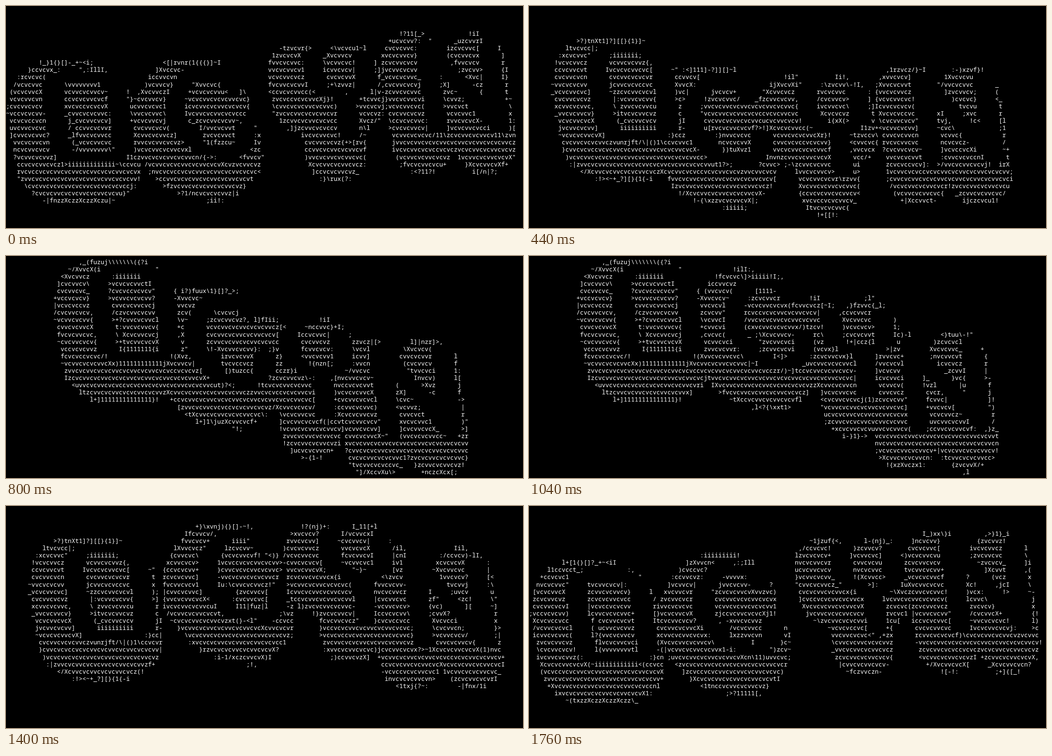
Animation, 1072 px wide and 462 px high, one loop 1.8 s. Source, as an HTML page with a canvas:

```html
<!DOCTYPE html>
<html>
<head>
<meta charset="utf-8">
<style>
html, body { margin: 0; width: 100%; height: 100%; overflow: hidden; background: #000; }
canvas { display: block; }
</style>
</head>
<body>
<canvas id="stage" width="1072" height="462"></canvas>
<script>
const LOOP = 1800, TICK = 40, STEP = 60, STEPS = 30;
const COLS = 142, ROWS = 31, CW = 7.55, CH = 15.1, TOP = 4.5;
const SWAY_X = -50, SWAY_Y = 58, LAG = 4.5;
const RAMP = " .'`^\",:;Il!i><~+_-?][}{1)(|\\/tfjrxnuvcz";

// Pens: an elliptic nib and its shift from the centre line.
const BACK = { w: 124, h: 113, x: -29, y: 34.5, color: "#fff" };
const FACE = { w: 47, h: 31, x: 0, y: 0, color: "#000" };

// Centre lines of the letters, each placed as it stands at step "at".
const letters = [
  { at: 25, line: "M125 125L145 112L222 114L254 140L266 230L270 275L245 290L160 289L140 272L121 160Z" },
  { at: 25, line: "M520 112L500 82L435 80L401 130L403 185L450 238L518 252L546 230L546 190" },
  { at: 29, line: "M643 90L654 155L715 182L722 260M750 92L760 155L715 182" },
  { at: 0, line: "M895 254L869 80L1024 252L1000 82" }
];

// The nib's height becomes its width once the path is stretched to match.
for (const l of letters) {
  for (const pen of [BACK, FACE]) {
    const path = new Path2D();
    path.addPath(new Path2D(l.line), new DOMMatrix([1, 0, 0, pen.w / pen.h, 0, 0]));
    (l.paths ||= []).push({ pen, path });
  }
}

const ctx = document.getElementById("stage").getContext("2d");
const small = document.createElement("canvas");
small.width = COLS;
small.height = ROWS;
const map = small.getContext("2d", { willReadFrequently: true });
map.lineCap = map.lineJoin = "round";

const wave = (step, i) => Math.cos((step - LAG * i) * 2 * Math.PI / STEPS);

// One map pixel per character cell, so antialiasing gives the coverage.
function drawMap(step) {
  map.setTransform(1, 0, 0, 1, 0, 0);
  map.fillStyle = "#000";
  map.fillRect(0, 0, COLS, ROWS);
  for (let i = letters.length - 1; i >= 0; i--) {
    const l = letters[i], d = wave(step, i) - wave(l.at, i);
    for (const { pen, path } of l.paths) {
      map.setTransform(1 / CW, 0, 0, pen.h / pen.w / CH,
        (SWAY_X * d + pen.x) / CW, (SWAY_Y * d + pen.y - TOP) / CH);
      map.lineWidth = pen.w;
      map.strokeStyle = pen.color;
      map.stroke(path);
    }
  }
  return map.getImageData(0, 0, COLS, ROWS).data;
}

function glyph(a, col, row) {
  if (a < 0.1) return " ";
  if (a > 0.93) return (col * 0.41 + row * 0.37) % 1 < 0.42 ? "c" : "v";
  if (a > 0.75) return "zcXz"[(col * 3 + row) % 4];
  return RAMP[Math.round(a / 0.8 * (RAMP.length - 1))];
}

function draw(step) {
  const data = drawMap(step);
  ctx.fillStyle = "#000";
  ctx.fillRect(0, 0, 1072, 462);
  ctx.fillStyle = "#fff";
  ctx.font = "12.58px 'Noto Sans Mono', 'DejaVu Sans Mono', monospace";
  for (let row = 0; row < ROWS; row++) {
    for (let col = 0; col < COLS; col++) {
      const ch = glyph(data[(row * COLS + col) * 4] / 255, col, row);
      if (ch !== " ") ctx.fillText(ch, col * CW, 16.5 + row * CH);
    }
  }
}

let last = -1;
function tick() {
  const t = performance.now() % LOOP;
  const step = Math.floor(Math.floor(t / TICK) * TICK / STEP);
  if (step !== last) draw(last = step);
  requestAnimationFrame(tick);
}
tick();
</script>
</body>
</html>
```
